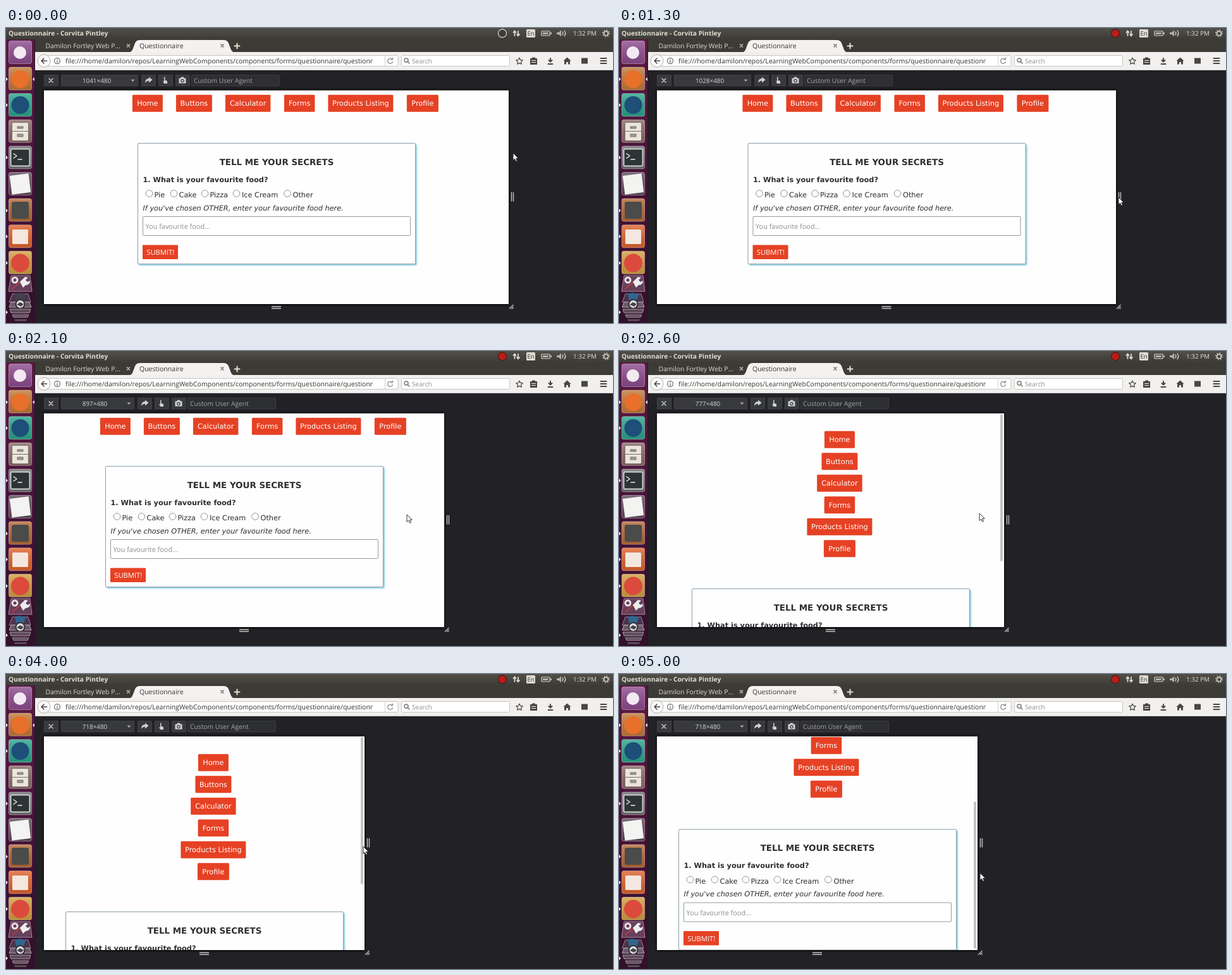
An HTML page that plays this animation: 960x467 px, repeating every 5.1 s.

```html
<!DOCTYPE html>
<html lang="en">
<head>
<meta charset="utf-8">
<title>Responsive questionnaire</title>
<style>
html, body { margin: 0; width: 100%; height: 100%; overflow: hidden; background: #222125; }
svg { display: block; }
text { font: 10.5px "Open Sans", "Noto Sans", sans-serif; text-rendering: geometricPrecision; white-space: pre; }
.mid { text-anchor: middle; }
.page text { font: 11.3px "DejaVu Sans", sans-serif; fill: #2e2e2e; }
.page .b { font-weight: bold; }
.page .h { font-size: 13.42px; }
.page .i { font-style: italic; }
.page .w { fill: #fff; }
.page .ui { font-family: "Open Sans", "Noto Sans", sans-serif; }
.btn { fill: #e64124; }
.line { fill: none; stroke-width: 1.5; stroke-linecap: round; stroke-linejoin: round; }
.tool { fill: #38393d; stroke: #424347; }
</style>
</head>
<body>
<svg id="stage" width="960" height="467" viewBox="0 0 960 467">
  <defs>
    <linearGradient id="bar" x2="0" y2="1"><stop stop-color="#514f48"/><stop offset="1" stop-color="#3c3b37"/></linearGradient>
    <linearGradient id="dock" x2="0" y2="1"><stop stop-color="#5a1a42"/><stop offset=".5" stop-color="#471238"/><stop offset="1" stop-color="#32102b"/></linearGradient>
    <linearGradient id="gloss" x2="0" y2="1"><stop stop-color="#fff" stop-opacity=".2"/><stop offset="1" stop-color="#000" stop-opacity=".12"/></linearGradient>
    <filter id="shade" x="-5%" y="-5%" width="110%" height="115%"><feDropShadow dx="1.8" dy="1.8" stdDeviation="1" flood-color="#62bcd6" flood-opacity=".8"/></filter>
    <filter id="blur" x="-5%" y="-5%" width="110%" height="110%"><feGaussianBlur stdDeviation="2"/></filter>
  </defs>
  <rect width="960" height="467" fill="#222125"/>

  <!-- title bar and tray -->
  <rect width="960" height="18" fill="url(#bar)"/>
  <text x="4" y="12" fill="#e2ded4" style="font-size:10.25px;font-weight:bold">Questionnaire - Corvita Pintley</text>
  <circle id="rec" cx="785" cy="8.5" r="6.5" stroke-width="1.400"/>
  <g class="line" stroke="#dfdbd2">
    <path d="M804.500 12V4.500l-2 2.500M804.500 4.500l2 2.500M810 5v7.500l-2-2.500M810 12.500l2-2.500" stroke-width="1.800"/>
    <rect x="847" y="5" width="13" height="7" rx="1" stroke-width="1.200"/>
    <path d="M862 7.500v2"/><path d="M880 6q2 2.500 0 5M883 4q3.500 4.500 0 9" stroke-width="1.200"/>
    <circle cx="949" cy="8.500" r="3.300"/>
    <circle cx="949" cy="8.500" r="5.200" stroke-dasharray="1.600 2.480" stroke-linecap="butt"/>
  </g>
  <path d="M849 7h9l-1 3h-8zM871 7h3l4-3.500v10l-4-3.500h-3z" fill="#b5b1a9"/>
  <rect x="823" y="2" width="14" height="13" rx="1.500" fill="#dfdbd2"/>
  <text class="mid" x="830" y="12" fill="#3c3b37" style="font-size:9.5px">En</text>
  <text x="897" y="12" fill="#e2ded4" style="font-size:9.9px">1:32 PM</text>

  <!-- tabs -->
  <rect x="46" y="18" width="914" height="21" fill="#3c3b36"/>
  <path d="M193 39q6 0 8-7l3-8q2-5 8-5h132q6 0 8 5l3 8q2 7 8 7z" fill="#f3f2f1"/>
  <text x="62.500" y="32" fill="#dedad2" style="font-size:10.4px">Damilon Fortley Web P…</text>
  <text x="211" y="32" fill="#35342f">Questionnaire</text>
  <g class="line">
    <path d="M191.500 26l4 4m0-4l-4 4" stroke="#d0ccc3"/>
    <path d="M340 26l4 4m0-4l-4 4" stroke="#66645e"/>
    <path d="M365.500 24.500v8M361.500 28.500h8" stroke="#e5e1d8" stroke-width="2"/>
  </g>

  <!-- address bar -->
  <rect x="46" y="38" width="914" height="29" fill="#f1f0ef"/>
  <rect x="46" y="66" width="914" height="1" fill="#cbc9c6"/>
  <rect x="62" y="43.500" width="558" height="17" rx="2" fill="#fff" stroke="#c9c6c1"/>
  <circle cx="60" cy="52" r="10" fill="#fafafa" stroke="#b4b1ab"/>
  <path d="M64.500 52H56m4-4l-4 4 4 4" class="line" stroke="#444" stroke-width="2"/>
  <g class="line" stroke="#858585" stroke-width="1">
    <circle cx="81" cy="52" r="4.500"/><path d="M81 51.500v3M81 49.500v.1"/>
    <path d="M599.500 44v16" stroke="#ddd"/>
    <path d="M611 50a4 4 0 1 0 .5 3.500M611.500 47v3h-3" stroke-width="1.200"/>
  </g>
  <svg x="94" y="44" width="486" height="16"><text y="12" fill="#33322f" style="font-size:10.52px">file:///home/damilon/repos/LearningWebComponents/components/forms/questionnaire/questionnaire.html</text></svg>
  <rect x="625.500" y="43.500" width="171" height="17" rx="2" fill="#fff" stroke="#c9c6c1"/>
  <g class="line" stroke="#777"><circle cx="633" cy="51" r="3"/><path d="M635.500 53.500l2.500 2.500"/></g>
  <text x="642" y="56" fill="#8f8f8f" style="font-size:10.1px">Search</text>
  <g class="line" stroke="#484743">
    <path d="M812 47l1.600 3.400 3.700.5-2.700 2.600.7 3.700-3.300-1.800-3.300 1.800.7-3.700-2.700-2.600 3.700-.5z" stroke-width="1.200"/>
    <path d="M861 48v5m-2.500-2L861 53.500l2.500-2.500M857.500 57h7" stroke-width="2"/>
    <path d="M940.500 48h9M940.500 52h9M940.500 56h9" stroke-width="2"/>
  </g>
  <path d="M829 48h3v-1.500h5v1.500h3v10h-11z" fill="#484743"/>
  <path d="M831 51.500h7M831 54.500h7" stroke="#f1f0ef"/>
  <path d="M887.500 46.500l6 5.500h-1.500v5.500h-3v-3.500h-3v3.500h-3v-5.500h-1.500z" fill="#484743"/>
  <rect x="910" y="47.500" width="10" height="9" fill="#484743"/>

  <!-- device toolbar -->
  <rect class="tool" x="60.500" y="74.500" width="22" height="17"/>
  <path d="M68 80l6 6m0-6l-6 6" class="line" stroke="#c8cacd" stroke-width="1.200"/>
  <rect id="select" class="tool" x="87.500" y="74.500" height="17"/>
  <text id="size" class="mid" y="86.500" fill="#d2d4d6" style="font-size:9.9px"></text>
  <g id="tools">
    <path d="M197.500 81.500h6l-3 3.500z" fill="#a9abae"/>
    <path class="tool" d="M214.500 74.500h22v17h-22zM241.500 74.500h22v17h-22zM268.500 74.500h22v17h-22z"/>
    <path d="M220 87q0-7 6-7v-2.500l5.500 4.500-5.500 4.500v-3q-4 0-6 3.500z" fill="#d0d2d5"/>
    <path d="M250 77.500v7l-2-1 2 4.500h5v-4l-3.500-1.500v-5z" fill="#d0d2d5"/>
    <path d="M273.500 79.500h2.500l1.500-2h3l1.500 2h2.500v8h-11z" fill="#d0d2d5"/>
    <circle cx="279" cy="83.500" r="2.200" fill="#d0d2d5" stroke="#38393d" stroke-width="1.200"/>
    <rect x="293.500" y="74.500" width="139" height="17" rx="1.500" fill="#2e2f32" stroke="#3d3e42"/>
    <text x="297" y="86.500" fill="#a4a6a9" style="font-size:10.3px">Custom User Agent</text>
  </g>

  <!-- tested page -->
  <rect id="halo" x="60" y="98" height="340" filter="url(#blur)"/>
  <svg id="view" class="page" x="60" y="98.500" height="338.500">
    <rect width="100%" height="100%" fill="#fefefe"/>
    <g transform="translate(0 -.5)">
      <g id="nav"></g>
      <g id="form">
        <rect width="439" height="191" rx="1.500" fill="#fefefe" stroke="#8d9fab" filter="url(#shade)"/>
        <text class="mid b h" x="219.500" y="34">TELL ME YOUR SECRETS</text>
        <text class="b" x="8" y="61">1. What is your favourite food?</text>
        <g id="choices"></g>
        <text class="i" x="8" y="106">If you've chosen OTHER, enter your favourite food here.</text>
        <rect x="8" y="116" width="423" height="30" rx="1" fill="#fff" stroke="#96999b"/>
        <text class="ui" x="12" y="135.500" style="font-size:10.9px;fill:#8c8c8c">You favourite food...</text>
        <rect class="btn" x="7.500" y="161" width="56" height="22.500" rx="1"/>
        <text class="ui mid w" x="35.800" y="176.500" style="font-size:11.2px">SUBMIT!</text>
      </g>
      <rect id="thumb" width="4" height="233" rx="2" fill="#c4c4c4"/>
    </g>
  </svg>
  <path id="sideGrip" d="M4.500 260v14.500M7.500 260v14.500" stroke="#c3c4c6" stroke-width="1.400"/>
  <path id="baseGrip" d="M-7.500 441h15M-7.500 444h15" stroke="#c3c4c6" stroke-width="1.400"/>
  <path id="corner" d="M1 444.500l6.500-6.500M4 444.500l3.500-3.500M6.500 444.500l1-1" stroke="#b7b8ba" stroke-width="1.300"/>

  <!-- launcher -->
  <rect y="18" width="45" height="449" fill="url(#dock)"/>
  <path d="M45.500 18v449" stroke="#2a1424"/>
  <g id="tiles"></g>
  <circle cx="22" cy="39" r="10" fill="#f3e9f2"/>
  <circle cx="22.500" cy="81" r="14" fill="#e8702a"/>
  <circle cx="22.500" cy="122" r="14" fill="#1d4f78"/>
  <g stroke="#77706a"><rect x="9.500" y="149.500" width="26" height="29" rx="2" fill="#ebe5dd"/><path d="M10 163.500h25"/><path d="M18 156h9v3h-9zM18 168h9v4h-9z" fill="#a19a93"/></g>
  <rect x="7.500" y="191.500" width="30" height="27" rx="2" fill="#2d3434" stroke="#c9cecd" stroke-width="2"/>
  <path d="M12 199l5 3.500-5 3.500M19 208h6" class="line" stroke="#eee"/>
  <rect x="7.500" y="232" width="30" height="30" fill="#f3f3f1" transform="rotate(-7 22.500 247)"/>
  <rect x="9" y="275" width="27" height="27" rx="3" fill="#4b4b49"/>
  <rect x="10" y="319" width="25" height="23" rx="1.500" fill="#f4e7df"/>
  <circle cx="22.500" cy="372" r="14.500" fill="#dc4a3d"/>
  <path d="M8 392h30l3 25H4z" fill="#67405c" stroke="#a58a9c"/>
  <path d="M10 413L24 401" class="line" stroke="#d8392f" stroke-width="6"/>
  <path d="M22 402l8-8 5 1-4 4 3 3 4-2q0 7-7 7l-4 4z" fill="#eee"/>
  <circle cx="14" cy="399" r="4" fill="none" stroke="#e9e4e6" stroke-width="3"/>
  <path d="M10 421h25l4 13H5z" fill="#4b344a" stroke="#97839a"/>
  <path id="badge" d="M14 421q8-4 17 1l-3 9H16z"/>
  <path d="M8 434h29l3 8H5z" fill="#6a5a68" stroke="#b5adb4"/>
  <circle cx="22.500" cy="437" r="7" fill="#e0dfe1" stroke="#353238" stroke-width="2"/>
  <path d="M17 438l5-4 6 3-4 4z" fill="#47434c"/>
  <path d="M6 445h33l-2 6H8zM10 454h26l-2 4H12z" fill="#5f4c5c" stroke="#a49aa1"/>
  <path d="M13 461h20l-1 3H14z" fill="#594c56"/>
  <g id="marks" fill="#eee6eb"></g>

  <!-- pointers -->
  <path id="arrow" d="M0 0v11.500l2.600-2.400 1.900 4.100 2-.9-1.900-4h3.700z" fill="#fff" stroke="#222" stroke-width=".9"/>
  <path id="resize" d="M-6.500 0l4.500-4.500v3h1V-7h2v5.500h1v-3L6.500 0 2 4.500v-3H1V7h-2V1.500h-1v3z" fill="#fff" stroke="#222" stroke-width=".8"/>
</svg>
<script>
const $ = id => document.getElementById(id);
const set = (id, attrs) => { for (const k in attrs) $(id).setAttribute(k, attrs[k]); };
const move = (id, x, y = 0) => set(id, { transform: `translate(${x} ${y})` });

const LOOP = 5100, STEP = 100, ZOOM = 0.706, LEFT = 60;

// label, x in the row from its centre, width
const links = [
  ['Home', -242, 48], ['Buttons', -173, 57], ['Calculator', -95, 71.5],
  ['Forms', -2, 48.5], ['Products Listing', 67.5, 103], ['Profile', 192, 50]
];
const choices = [['Pie', 18, 26], ['Cake', 57, 65], ['Pizza', 106, 114], ['Ice Cream', 156, 164.5], ['Other', 236.5, 245]];
const tiles = ['#8d4c8f', '#c17a39', '#2ba58b', '#8d6a66', '#6f6b70', '#5d4b5a', '#b56a35', '#e0642d', '#d3a143'];

// time, page width in CSS pixels
const widths = [
  [1200, 1041], [1300, 1028], [1500, 957], [1600, 943], [1800, 943], [2100, 897],
  [2400, 811], [2500, 792], [2600, 777], [3000, 737], [3500, 718]
];
// time, x, y
const pointer = [
  [0, 802, 198], [800, 800, 268], [1300, 790, 268], [1600, 729, 267], [2100, 634, 259],
  [2600, 570, 257], [3200, 563, 262], [4000, 565, 273], [4500, 567, 290], [5000, 571, 315]
];
const scrolls = [[4300, 0], [4400, 30], [4600, 110], [4800, 130.5]];

function at(track, t, col = 1) {
  const i = track.findIndex(k => k[0] > t);
  if (i === 0) return track[0][col];
  if (i < 0) return track[track.length - 1][col];
  const a = track[i - 1], b = track[i];
  return a[col] + (b[col] - a[col]) * (t - a[0]) / (b[0] - a[0]);
}

$('nav').innerHTML = links.map(([label, , w], i) =>
  `<g id="link${i}"><rect class="btn" width="${w}" height="27" rx="1.5"/>` +
  `<text class="mid w" x="${w / 2}" y="17.5">${label}</text></g>`).join('');
$('choices').innerHTML = choices.map(([label, cx, x]) =>
  `<circle cx="${cx}" cy="79.500" r="5.300" fill="#fff" stroke="#929292"/><text x="${x}" y="85.500">${label}</text>`).join('');
$('tiles').innerHTML = tiles.map((fill, i) => {
  const box = `x="4.500" y="${20.5 + i * 41.6}" width="36" height="36" rx="3"`;
  return `<rect ${box} fill="${fill}"/><rect ${box} fill="url(#gloss)" stroke="#fff" stroke-opacity=".35"/>`;
}).join('');
$('marks').innerHTML = [81, 122, 205, 289, 330, 372, 450].map(y => `<path d="M0 ${y - 3}l3 3-3 3z"/>`).join('') +
  '<path d="M45 78l-3 3 3 3z"/>';

function draw(t) {
  const px = Math.round(at(widths, t)), w = Math.round(px * ZOOM), edge = LEFT + w;
  const stacked = px <= 800, wide = px > 999, scroll = at(scrolls, t);

  set('view', { width: w });
  set('halo', { width: w });
  links.forEach(([, x, lw], i) => {
    const mid = w / 2 + 14.4;
    if (stacked) move('link' + i, mid - lw / 2, 28.8 + i * 34.5 - scroll);
    else move('link' + i, mid + x, 7.7);
  });
  move('form', (w - 439) / 2 + 0.5, stacked ? 278.5 - scroll : 84.5);
  set('thumb', { x: w - 6, y: 2 + scroll * 0.78, visibility: stacked ? 'visible' : 'hidden' });

  move('sideGrip', edge);
  move('baseGrip', LEFT + w / 2);
  move('corner', edge);

  set('select', { width: wide ? 121 : 115 });
  set('size', { x: wide ? 143.5 : 140.5 });
  $('size').textContent = px + '×480';
  move('tools', wide ? 0 : -6);

  const x = at(pointer, t), y = at(pointer, t, 2), sizing = t >= 700 && t < 1300;
  move('arrow', x, y);
  move('resize', x, y);
  set('arrow', { visibility: sizing ? 'hidden' : 'visible' });
  set('resize', { visibility: sizing ? 'visible' : 'hidden' });

  set('rec', t < 100 ? { fill: '#3b3a37', stroke: '#c9c5bd' } : { fill: '#b81d19', stroke: '#5a1a17' });
  set('badge', { fill: t < 300 ? '#45414b' : '#2f6790' });
}

function tick(now) {
  draw(Math.floor(now % LOOP / STEP) * STEP);
  requestAnimationFrame(tick);
}
draw(0);
requestAnimationFrame(tick);
</script>
</body>
</html>
```
